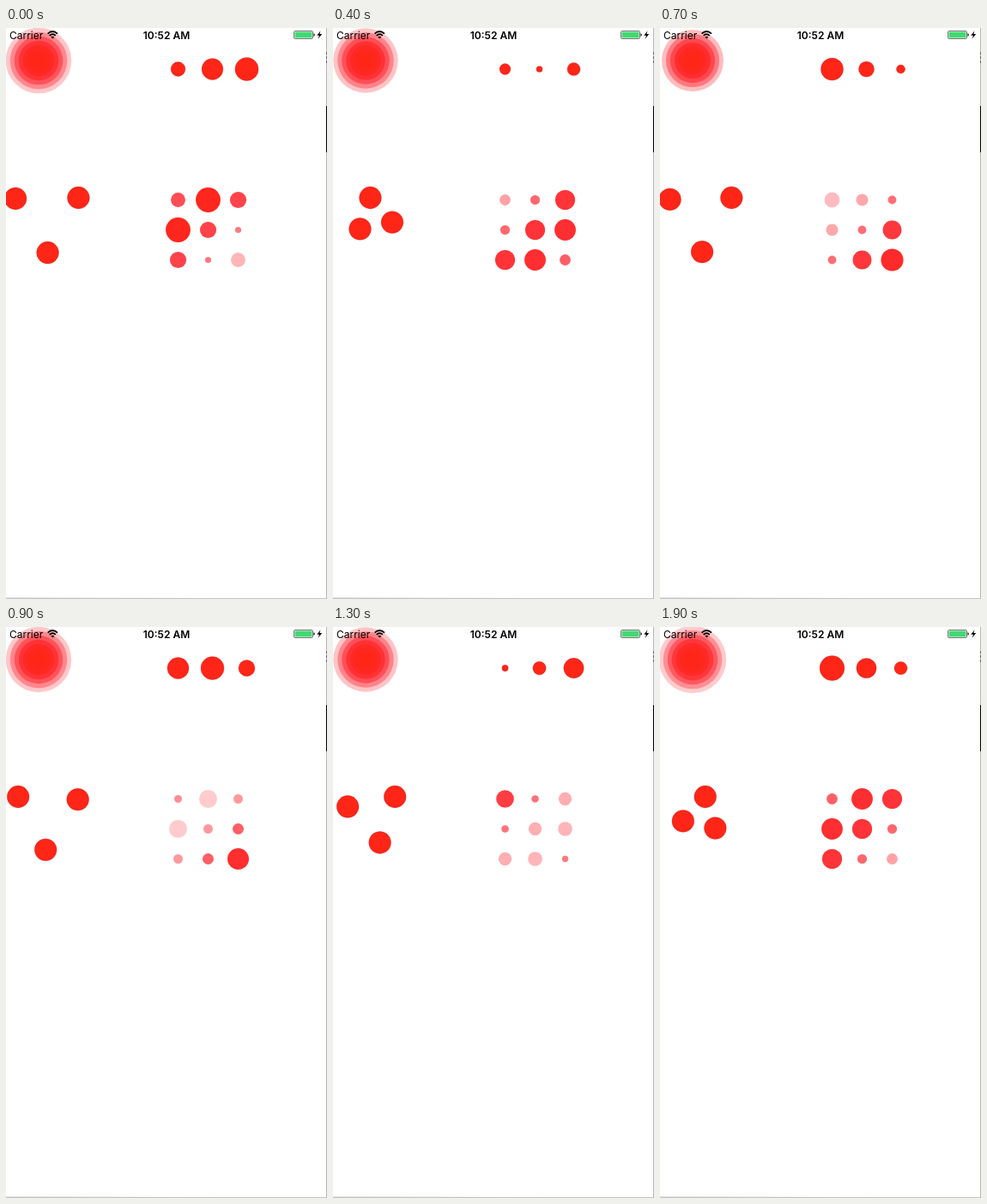
Write an HTML page with a canvas that moves like this. It is 374 px wide and 666 px high and loops after 2 s.

```html
<!DOCTYPE html>
<html lang="en">
<head>
<meta charset="utf-8">
<title>Loading indicators</title>
<style>
  html, body { margin: 0; width: 100%; height: 100%; overflow: hidden; background: #fff; }
  canvas, svg { position: absolute; left: 0; top: 0; display: block; }
  text { font: 12px Inter, sans-serif; }
</style>
</head>
<body>
<canvas id="stage" width="374" height="666"></canvas>
<svg width="374" height="666" viewBox="0 0 374 666">
  <defs>
    <linearGradient id="fade">
      <stop offset="0" stop-color="#ddd"/>
      <stop offset="1" stop-color="#fff"/>
    </linearGradient>
  </defs>

  <!-- window edges -->
  <rect y="664" width="250" height="1" fill="url(#fade)"/>
  <rect y="665" width="374" height="1" fill="#c4c4c4"/>
  <rect x="373" width="1" height="666" fill="#b8b8b8"/>
  <rect x="373" y="91" width="1" height="54"/>
  <path d="M373.5 28V41" stroke="#666" stroke-dasharray="3 2"/>

  <!-- status bar -->
  <text x="4" y="12.5">Carrier</text>
  <text x="187" y="12.5" text-anchor="middle" style="font-weight:600">10:52 AM</text>
  <g fill="none" stroke="#000" stroke-width="1.7">
    <path d="M48.6 6.6Q54.3 1.4 60 6.6"/>
    <path d="M50.7 8.9Q54.3 5.6 57.9 8.9"/>
  </g>
  <path d="M52.3 10.5Q54.3 8.9 56.3 10.5L54.3 12.6Z"/>
  <rect x="335.5" y="3.5" width="22" height="9" rx="1.5" fill="#fff" stroke="#555" stroke-width=".8"/>
  <rect x="336.5" y="4.5" width="20" height="7" rx=".6" fill="#43d873"/>
  <path d="M358.4 6.3Q360 6.5 360 8T358.4 9.7Z" fill="#333"/>
  <path d="M366.5 3.2L362.3 8.7H365L363.6 12.8L368.2 7.1H365.4Z"/>
</svg>
<script>
const LOOP = 2000, STEP = 100;
const SPEED = 1.105, START = 6.33; // seconds on the indicators' shared clock
const ctx = document.getElementById('stage').getContext('2d');

const mod = (value, size) => ((value % size) + size) % size;
const pingPong = (time, duration) => duration - Math.abs(mod(time, 2 * duration) - duration);
const dotRadius = time => 15 - 20 * pingPong(time, 0.6);
const fadeAlpha = progress => 1 - 0.8 * progress;

// Red over white at the given coverage
function tint(alpha) {
  const rest = 1 - alpha;
  const green = Math.min(255, Math.hypot(38, 255 * rest));
  return `rgb(255, ${Math.round(green)}, ${Math.round(24 + 231 * rest)})`;
}

function dot(x, y, radius, alpha = 1) {
  ctx.beginPath();
  ctx.arc(x, y, radius, 0, 2 * Math.PI);
  ctx.fillStyle = tint(alpha);
  ctx.fill();
}

function outlinedDot(x, y, radius) {
  dot(x, y, radius);
  ctx.strokeStyle = 'rgba(190, 10, 10, .6)';
  ctx.lineWidth = 0.5;
  ctx.stroke();
}

// cubic-bezier(.42, 0, .58, 1)
function easeInOut(progress) {
  let low = 0, high = 1, u = 0.5;
  for (let i = 0; i < 20; i++) {
    u = (low + high) / 2;
    const x = 1.26 * u * (1 - u) ** 2 + 1.74 * u * u * (1 - u) + u ** 3;
    if (x < progress) low = u; else high = u;
  }
  return u * u * (3 - 2 * u);
}

function drawRipple(time) {
  let rest = 1;
  for (let ring = 7; ring >= 0; ring--) {
    const progress = (mod(time, 0.5) + 0.5 * ring) / 4;
    rest *= 1 - fadeAlpha(progress);
    dot(38, 38, 40 * progress, 1 - rest);
  }
}

function drawWave(time) {
  for (let i = 0; i < 3; i++) {
    outlinedDot(200.5 + 40 * i, 48, dotRadius(time - 0.2 * i));
  }
}

function drawTriangle(time) {
  const corners = [[10.5, 198], [85.5, 198], [48, 263]];
  const amount = easeInOut(mod(time, 0.8) / 0.8);
  corners.forEach(([x, y], i) => {
    const [nextX, nextY] = corners[(i + 1) % 3];
    outlinedDot(x + (nextX - x) * amount, y + (nextY - y) * amount, 12.9);
  });
}

function drawGrid(time) {
  for (let row = 0; row < 3; row++) {
    for (let column = 0; column < 3; column++) {
      const progress = pingPong(time - 0.3 * (row + column), 1);
      dot(200.5 + 35 * column, 200.5 + 35 * row, dotRadius(progress), fadeAlpha(progress));
    }
  }
}

function draw() {
  const elapsed = Math.floor((performance.now() % LOOP) / STEP) * STEP;
  const time = START + SPEED * elapsed / 1000;
  ctx.clearRect(0, 0, 374, 666);
  drawRipple(time);
  drawWave(time);
  drawTriangle(time);
  drawGrid(time);
  requestAnimationFrame(draw);
}
draw();
</script>
</body>
</html>
```
